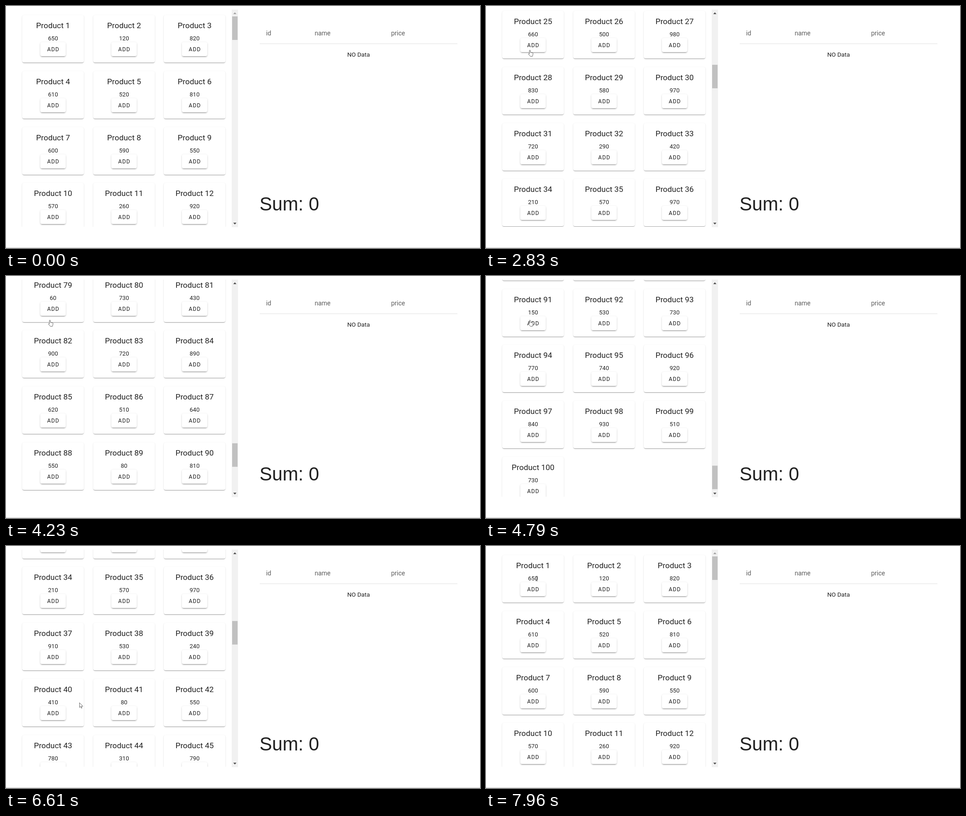
Animation, 1048 px wide and 535 px high, one loop 8000 ms. Source, as an HTML page:

```html
<!DOCTYPE html>
<html lang="en">
<head>
<meta charset="utf-8">
<title>Product list</title>
<style>
html, body { margin: 0; width: 100%; height: 100%; overflow: hidden; background: #fff; }
body { position: relative; font-family: Roboto, sans-serif; color: rgba(0,0,0,.87); }
body *, svg { position: absolute; box-sizing: border-box; }
#view { left: 0; top: 8px; width: 499px; height: 480px; overflow: hidden; }
#list { left: 0; top: 0; }
.card { width: 136px; height: 105px; border-radius: 4px; background: #fff; text-align: center;
  box-shadow: 0 2px 1px -1px rgba(0,0,0,.2), 0 1px 1px rgba(0,0,0,.14), 0 1px 3px rgba(0,0,0,.12); }
.card b, .card i { left: 0; width: 100%; line-height: 20px; font-weight: 400; font-style: normal; white-space: nowrap; }
.card b { top: 13px; font-size: 17.4px; }
.card i { top: 42px; font-size: 13px; }
.add { left: 40px; top: 60px; width: 56px; height: 31px; border-radius: 4px; background: #fff;
  font-size: 12.2px; line-height: 32px; letter-spacing: 1px; text-indent: 1px;
  box-shadow: 0 3px 1px -2px rgba(0,0,0,.2), 0 2px 2px rgba(0,0,0,.14), 0 1px 4px rgba(0,0,0,.12); }
.add.hover { background: #f5f5f5;
  box-shadow: 0 2px 4px -1px rgba(0,0,0,.2), 0 3px 4px rgba(0,0,0,.14), 0 1px 8px rgba(0,0,0,.12); }
#bar { left: 499px; top: 8px; width: 14px; height: 481px; background: #f1f1f1; }
#thumb { left: 1px; top: 15px; width: 12px; height: 51.5px; background: #c1c1c1; }
#bar svg { left: 0; width: 14px; height: 14px; }
.th, #none { top: 50px; line-height: 20px; font-size: 14px; color: rgba(0,0,0,.64); white-space: nowrap; }
#none { left: 561px; top: 97px; width: 437px; text-align: center; font-size: 13.5px; color: rgba(0,0,0,.87); }
#rule { left: 561px; top: 83px; width: 437px; height: 1px; background: #e0e0e0; }
#sum { left: 560.5px; top: 414px; font: 41.6px/48px "Liberation Sans", Arial, sans-serif; white-space: nowrap; }
#foot { left: 0; top: 534px; width: 1048px; height: 1px; background: #ccc; }
#cursor { left: 0; top: 0; overflow: visible; fill: #fff; stroke: #444; stroke-width: .8; stroke-linejoin: round; }
</style>
</head>
<body>
<div id="view"><div id="list"></div></div>
<div id="bar">
  <svg><path id="up" d="M3.5 10 7 6l3.5 4z"/></svg>
  <div id="thumb"></div>
  <svg style="top:467px"><path id="down" d="M3.5 4 7 8l3.5-4z"/></svg>
</div>
<div class="th" style="left:575px">id</div>
<div class="th" style="left:682.5px">name</div>
<div class="th" style="left:851.5px">price</div>
<div id="rule"></div>
<div id="none">NO Data</div>
<div id="sum">Sum: 0</div>
<div id="foot"></div>
<svg id="cursor" width="14" height="17"><path id="shape"/></svg>
<script>
const LOOP = 8000, STEP = 70, MAX = 3735, NOTCH = 73, ROW = 123.75;
const $ = id => document.getElementById(id);

const FIRST_PRICES = [650, 120, 820, 610, 520, 810, 600, 590, 550, 570, 260, 920];

function price(n) {
  const r = Math.abs(Math.sin(n * 12.9898) * 43758.5453) % 1;
  return FIRST_PRICES[n - 1] || 20 + 10 * Math.floor(r * 97);
}

function buildList() {
  let html = '';
  for (let n = 1; n <= 100; n++) {
    const x = Math.round(36 + (n - 1) % 3 * 156.6);
    const y = Math.round(12 + Math.floor((n - 1) / 3) * ROW);
    html += `<div class="card" style="left:${x}px;top:${y}px"><b>Product ${n}</b><i>${price(n)}</i><div class="add">ADD</div></div>`;
  }
  $('list').innerHTML = html;
}

// Phases in which the screen refreshes, once per STEP; it rests in between
const ENTER = [580, 1480], DOWN = [2340, 4920], CROSS = [5380, 5930],
  UP = [6130, 7300], LEAVE = [7490, 7960];

function snap(t) {
  const phase = [ENTER, DOWN, CROSS, UP, LEAVE].filter(p => p[0] <= t).pop();
  if (!phase) return 0;
  const [a, b] = phase, n = Math.round((b - a) / STEP), step = (b - a) / n;
  return a + step * Math.min(n, Math.floor((t - a) / step + .1));
}

// Monotone cubic through [time, value] points
function curve(keys) {
  const sec = keys.slice(1).map((k, i) => (k[1] - keys[i][1]) / (k[0] - keys[i][0]));
  const slope = keys.map((_, i) => {
    const a = sec[i - 1], b = sec[i];
    return a * b > 0 ? 2 * a * b / (a + b) : 0;
  });
  return t => {
    if (t <= keys[0][0]) return keys[0][1];
    const j = keys.findIndex(k => k[0] >= t);
    if (j < 0) return keys[keys.length - 1][1];
    const [t0, v0] = keys[j - 1], [t1, v1] = keys[j];
    const h = t1 - t0, u = (t - t0) / h, w = 1 - u;
    return v0 * (1 + 2 * u) * w * w + v1 * u * u * (3 - 2 * u)
      + h * u * w * (slope[j - 1] * w - slope[j] * u);
  };
}

const scrollDown = curve([[DOWN[0] - STEP, 0], [DOWN[0], NOTCH], [3386, 2136], [4223, 3241], [DOWN[1], MAX]]);
const scrollUp = curve([[UP[0] - STEP, MAX - NOTCH], [6612, 1334], [UP[1], 0]]);

function scrollAt(t) {
  if (t < CROSS[1] - 1) return scrollDown(t);
  return scrollUp(t);
}

// Pointer stops: time, x, y
const STOPS = [[ENTER[0], 699, 401], [1200, 112, 66], [ENTER[1], 97, 97], [CROSS[0] - STEP, 97, 97],
  [CROSS[1], 161, 346], [LEAVE[0] - STEP, 162, 345], [LEAVE[1], 112, 72]];
const pointerX = curve(STOPS.map(([t, x]) => [t, x]));
const pointerY = curve(STOPS.map(([t, , y]) => [t, y]));

const SHAPES = {
  arrow: 'M.5.5V11L3 8.8l1.7 3.8 1.4-.6-1.6-3.7H8z',
  hand: 'M0 .5c.7 0 1.1.5 1.1 1.2v3.8l4.6.9c.9.2 1.4.8 1.3 1.7l-.5 3.2-.9 3H1.1L-3 9.7c-.6-.9.5-1.8 1.4-1.1l.6.6V1.7C-1 1-.6.5 0 .5z',
  beam: 'M-2.5-5H2.5M0-5V5M-2.5 5H2.5'
};

function shapeAt(t) {
  if (t >= 1340 && t < CROSS[0]) return SHAPES.hand;
  return t >= LEAVE[1] - STEP ? SHAPES.beam : SHAPES.arrow;
}

function draw(time) {
  const t = snap(time), y = Math.round(scrollAt(t));
  const arrowColor = on => on ? '#505050' : '#a3a3a3';
  $('list').style.transform = `translateY(${-y}px)`;
  $('thumb').style.transform = `translateY(${y * .107}px)`;
  $('up').setAttribute('fill', arrowColor(t >= DOWN[0] && t < LEAVE[0]));
  $('down').setAttribute('fill', arrowColor(y < MAX));
  firstAdd.classList.toggle('hover', t >= DOWN[0] && t < CROSS[0]);

  $('cursor').style.display = t < ENTER[0] ? 'none' : 'block';
  $('cursor').style.transform = `translate(${Math.round(pointerX(t))}px,${Math.round(pointerY(t))}px)`;
  $('shape').setAttribute('d', shapeAt(t));
}

buildList();
const firstAdd = document.querySelector('.add');
const start = performance.now();
function tick() {
  draw((performance.now() - start) % LOOP);
  requestAnimationFrame(tick);
}
tick();
</script>
</body>
</html>
```
